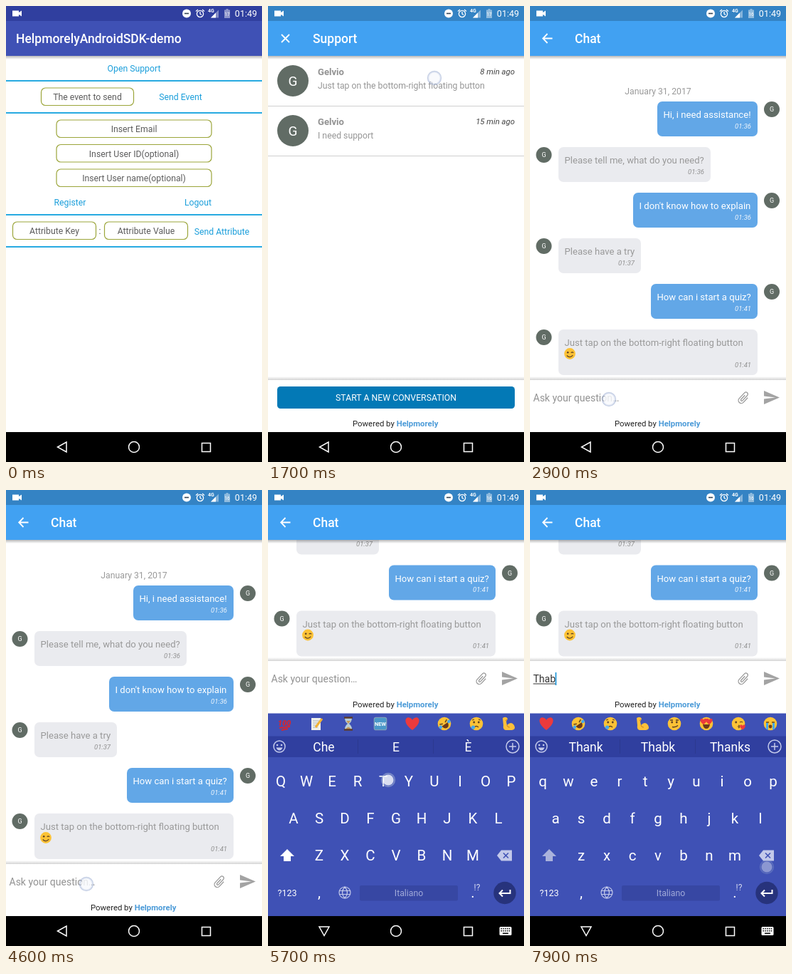
An HTML page with a canvas that plays this animation: 360 by 640 pixels, repeating every 8 s.

```html
<!DOCTYPE html>
<html lang="en">
<head>
<meta charset="utf-8">
<title>Support chat demo</title>
<style>
  html, body { margin: 0; width: 100%; height: 100%; overflow: hidden; background: #fff; }
  canvas { display: block; width: 360px; height: 640px; }
</style>
</head>
<body>
<canvas id="stage" width="360" height="640"></canvas>
<script>
const g = document.getElementById('stage').getContext('2d');
const LOOP = 8000, STEP = 100, BRAND = 'Helpmorely', PERSON = 'Gelvio';
const INDIGO = '#3f51b5', GREY = '#a3a3a3';

const clamp = v => Math.max(0, Math.min(1, v));
const easeOut = k => 1 - (1 - k) ** 2;
const current = (steps, t) => steps.filter(([from]) => from <= t).pop()[1];

function scoped(draw, { x = 0, y = 0, alpha = 1, rot = 0, scale = 1 } = {}) {
  g.save();
  g.globalAlpha *= alpha;
  g.translate(x, y);
  g.rotate(rot);
  g.scale(scale, scale);
  draw();
  g.restore();
}
function rect(x, y, w, h, fill) {
  g.fillStyle = fill;
  g.fillRect(x, y, w, h);
}
function rounded(x, y, w, h, r, fill, stroke) {
  g.beginPath();
  g.roundRect(x, y, w, h, r);
  if (fill) { g.fillStyle = fill; g.fill(); }
  if (stroke) { g.strokeStyle = stroke; g.lineWidth = 1.2; g.stroke(); }
}
function disc(x, y, r, fill) {
  g.beginPath();
  g.arc(x, y, r, 0, 7);
  g.fillStyle = fill;
  g.fill();
}
function text(str, x, y, size, color, align = 'left', style = '') {
  g.font = `${style} ${size}px Roboto, sans-serif`;
  g.textAlign = align;
  g.fillStyle = color;
  g.fillText(str, x, y);
}
function fillIcon(d, x, y, color, opts) {
  scoped(() => { g.fillStyle = color; g.fill(new Path2D(d)); }, { x, y, ...opts });
}
function lineIcon(d, x, y, color, width = 1.5, opts) {
  scoped(() => {
    g.strokeStyle = color;
    g.lineWidth = width;
    g.stroke(new Path2D(d));
  }, { x, y, ...opts });
}
const ring = r => `M${r} 0A${r} ${r} 0 1 1 ${-r} 0A${r} ${r} 0 1 1 ${r} 0`;
function shade(y, h, from, to) {
  const grad = g.createLinearGradient(0, y, 0, y + h);
  grad.addColorStop(0, `rgba(0,0,0,${from})`);
  grad.addColorStop(1, `rgba(0,0,0,${to})`);
  rect(0, y, 360, h, grad);
}

// --- system bars ---
function statusIcons(t) {
  const w = '#fff';
  fillIcon('M0 0H9V2.5L13 0V8L9 5.5V8H0Z', 9, 6.5, w);
  disc(254, 10.5, 6, w);
  rect(251, 9.7, 6, 1.6, '#345');
  lineIcon(ring(4.6) + 'M0 -3V0L2 1.5M-6 -3.5L-3 -6M6 -3.5L3 -6', 273, 11, w, 1.3);
  text('4G', 284, 9, 7, w, 'left', 'bold');
  fillIcon('M0 0L11 -11V0Z', 288, 16.5, 'rgba(255,255,255,.4)');
  fillIcon('M0 0L7 -7V0Z', 288, 16.5, w);
  fillIcon('M0 1.5H2.5V0H5.5V1.5H8V13H0Z', 307, 4, 'rgba(255,255,255,.45)');
  text(t < 2300 ? '17' : '16', 311, 14, 6.5, w, 'center');
  text('01:49', 353, 15, 12.5, w, 'right');
}
function navBar(keyboardOpen) {
  rect(0, 598, 360, 42, '#000');
  lineIcon(keyboardOpen ? 'M-7 -6H7L0 6.5Z' : 'M6 -7V7L-6.5 0Z', 79, 619, '#fff', 1.5);
  lineIcon(ring(7.5), 180, 619, '#fff');
  lineIcon('M-6 -6H6V6H-6Z', 281.5, 619.5, '#fff');
  if (!keyboardOpen) return;
  rounded(325.5, 613, 17, 12, 1.5, '#fff');
  for (let i = 0; i < 5; i++) {
    rect(327.5 + i * 2.8, 615, 1.5, 1.5, '#000');
    rect(327.5 + i * 2.8, 618, 1.5, 1.5, '#000');
  }
  rect(330, 621.5, 8, 1.5, '#000');
}
function header(title, x, bar, status) {
  shade(70, 5, .28, 0);
  rect(0, 0, 360, 70, bar);
  rect(0, 0, 360, 21, status);
  text(title, x, 52, 17.5, '#fff', 'left', '500');
}
const blueHeader = title => header(title, 63, '#41a1f2', '#3483c4');

// --- screens ---
function demoScreen() {
  const link = (s, x, y) => text(s, x, y, 12.25, '#1c9fdb', 'center');
  const field = (s, x, y, w) => {
    rounded(x + .5, y + .5, w, 24.5, 6, null, '#9ba53a');
    text(s, x + w / 2 + .5, y + 17.5, 12.25, '#5c5c5c', 'center');
  };
  rect(0, 0, 360, 640, '#fff');
  header(BRAND + 'AndroidSDK-demo', 14, INDIGO, '#303f9f');
  for (const y of [104, 149, 292, 337]) rect(0, y, 360, 2, '#27aae1');
  link('Open Support', 180, 92);
  link('Send Event', 245.5, 132);
  link('Register', 90, 280);
  link('Logout', 270, 280);
  link('Send Attribute', 303.5, 320.5);
  field('The event to send', 49, 114.5, 130);
  field('Insert Email', 70.5, 159.5, 218);
  field('Insert User ID(optional)', 70.5, 194, 218);
  field('Insert User name(optional)', 70.5, 228.5, 218);
  field('Attribute Key', 9, 302.5, 117);
  field('Attribute Value', 138, 302.5, 117);
  text(':', 132, 320, 12.25, '#555', 'center');
}
function avatar(x, y, r, size) {
  disc(x, y, r, '#616c65');
  text('G', x, y + size * .36, size, '#fff', 'center');
}
function poweredBy(y) {
  text('Powered by ', 119, y, 11.375, '#222');
  text(BRAND, 119 + g.measureText('Powered by ').width, y, 11.375, '#4c9bd8', 'left', 'bold');
}
function bottomPanel(y) {
  shade(y - 3, 5, 0, .17);
  rect(0, y + 2, 360, 640 - y, '#fff');
  poweredBy(y + 67);
}
function supportScreen(t) {
  rect(0, 0, 360, 640, '#fff');
  blueHeader('Support');
  lineIcon('M-5.5 -5.5L5.5 5.5M5.5 -5.5L-5.5 5.5', 24.5, 45.5, '#fff', 1.8);
  const row = (y, message, age) => {
    avatar(35, y + 35, 22, 19);
    text(PERSON, 70, y + 27, 13.125, '#929292', 'left', 'bold');
    text(message, 70, y + 46, 12.25, '#969696');
    text(age, 347, y + 25.5, 11.375, '#444', 'right', 'italic');
    rect(0, y + 70, 360, 1, '#cfcfcf');
  };
  if (t >= 700) {
    row(70, 'Just tap on the bottom-right floating button', '8 min ago');
    row(140, 'I need support', '15 min ago');
  }
  bottomPanel(523);
  rounded(13, 534, 334, 31, 4.5, '#0379b6');
  text('START A NEW CONVERSATION', 180, 554, 12.25, '#fff', 'center');
}
// top, left, right, text, time
const MESSAGES = [
  [134, 179, 320, 'Hi, i need assistance!', '01:36'],
  [198, 40, 254, 'Please tell me, what do you need?', '01:36'],
  [262, 145, 320, "I don't know how to explain", '01:36'],
  [326, 40, 156, 'Please have a try', '01:37'],
  [390, 170, 320, 'How can i start a quiz?', '01:41'],
  [454, 40, 320, 'Just tap on the bottom-right floating button', '01:41', 'wink'],
];
function chatMessages() {
  text('January 31, 2017', 180, 124, 12.25, '#999', 'center');
  for (const [y, x, right, message, time, extra] of MESSAGES) {
    const mine = x > 40, h = extra ? 64 : 49;
    rounded(x, y, right - x, h, 7, mine ? '#62a7e7' : '#eaebef');
    text(message, x + 8.5, y + 23, 13.125, mine ? '#fff' : '#999');
    text(time, right - 9, y + h - 11.5, 9.5, mine ? '#f2f7fd' : '#8f8f8f', 'right', 'italic');
    avatar(mine ? 340 : 19.5, y + 11, 11, 9);
    if (extra) emoji(extra, x + 16, y + 34, .85);
  }
}
const TYPED = [[0, ''], [6200, 'T'], [6500, 'Th'], [6700, 'Tha'], [6900, 'Thab'], [7000, 'Thabk'], [7800, 'Thab']];
function chatScreen(t) {
  const lifted = t >= 5200, y = lifted ? 238 : 523, typed = current(TYPED, t);
  rect(0, 0, 360, 640, '#fff');
  if (t >= 2400) scoped(chatMessages, { y: lifted ? -284.5 : 0 });
  blueHeader('Chat');
  lineIcon('M7 0H-6M0 -6.5L-6.3 0L0 6.5', 24.5, 45.5, '#fff', 1.8);
  bottomPanel(y);
  if (typed) {
    text(typed, 4.5, y + 32, 14, '#333');
    const w = g.measureText(typed).width;
    rect(4.5, y + 33.5, w, 1, '#333');
    rect(4 + w, y + 18, 1.7, 18, '#2196d8');
  } else {
    text('Ask your question…', 4.5, y + 32, 14, '#929292');
  }
  lineIcon('M4 -4V5A4 4 0 0 1 -4 5V-6A2.7 2.7 0 0 1 1.4 -6V4A1.3 1.3 0 0 1 -1.3 4V-4',
    300.5, y + 27, '#999', 1.3, { rot: .75 });
  fillIcon('M0 0L22 9.5L0 19V11.6L16 9.5L0 7.4Z', 329, y + 17, GREY);
}

// --- emoji ---
const HEART = 'M0 9C-14 -1 -10 -10 -4.500 -8.500Q-1 -8 0 -5Q1 -8 4.500 -8.500C10 -10 14 -1 0 9Z';
const heart = (x, y, scale = 1) => fillIcon(HEART, x, y, '#ec3a3c', { scale });
const dark = (d, w = 1.5) => lineIcon(d, 0, 0, '#5f4223', w);
const eyes = () => { disc(-3.3, -2, 1.4, '#5f4223'); disc(3.3, -2, 1.4, '#5f4223'); };
const grin = () => fillIcon('M-5 1H5Q4 7 0 7Q-4 7 -5 1Z', 0, 0, '#6b3a1c');
const tear = (x, y, r = 2.3) => disc(x, y, r, '#45a9ee');
const FACES = {
  wink() { disc(-3.3, -2, 1.5, '#5f4223'); dark('M2 -1.500Q4 -3.500 6 -1.500M-5 3Q0 8 5 2.500'); },
  rofl() { scoped(() => { dark('M-6 -3L-2 -1M6 -3L2 -1'); grin(); tear(-7, 1); tear(7, 1); }, { rot: -.6 }); },
  cry() { eyes(); dark('M-3 5Q0 2 3 5M-6 -5L-3 -6M6 -5L3 -6', 1.2); tear(-4.5, 5, 2.6); },
  smirk() { eyes(); dark('M-3 4.500Q2 5.500 5 2.500M-6 -5H-2M2 -5H6'); },
  love() { heart(-4, -3, .48); heart(4, -3, .48); grin(); },
  kiss() { disc(-3.3, -2, 1.4, '#5f4223'); dark('M2 -2Q4 -3.500 6 -2M0 2Q3 3 0 4Q3 5 0 6', 1.2); heart(6, 5, .4); },
  sob() {
    dark('M-6 -2H-2M2 -2H6');
    rect(-6, -1, 3, 9, '#45a9ee');
    rect(3, -1, 3, 9, '#45a9ee');
    disc(0, 4, 2.4, '#6b3a1c');
  },
};
const OBJECTS = {
  hundred() {
    text('100', 0, 2.5, 11, '#d9262f', 'center', 'italic 900');
    lineIcon('M-7 6L8 4M-4 9L5 7', 0, 0, '#d9262f', 1.8);
  },
  memo() {
    rect(-7, -8, 13, 17, '#f1f1ea');
    lineIcon('M-5 -4H4M-5 -1H3M-5 2H1M-5 5H2', 0, 0, '#a8b3bd', 1);
    lineIcon('M8 -7L-1 5', 0, 0, '#f2b234', 3);
  },
  hourglass() {
    fillIcon('M-5 -8H5Q5 -3 1 0Q5 3 5 8H-5Q-5 3 -1 0Q-5 -3 -5 -8Z', 0, 0, '#b9cdd6');
    fillIcon('M-3 -4H3L0 0ZM-4 8Q0 1 4 8Z', 0, 0, '#c99a58');
    lineIcon('M-6 -8.500H6M-6 8.500H6', 0, 0, '#5d3c2c', 2.4);
  },
  fresh() { rounded(-8.7, -8.7, 17.4, 17.4, 2.5, '#4a97c9', '#7f9fb8'); text('NEW', 0, 2.7, 7.5, '#fff', 'center', 'bold'); },
  heart() { heart(0, 0); },
  flex() {
    fillIcon('M-8 -8Q-3 -11 -1 -7L-3 -3L-2 2Q4 -4 8 2Q11 8 5 9H-4Q-8 8 -7 2Z', 0, 0, '#fcc03a');
    lineIcon('M-2 2Q-1 5 2 5M-4 -4L-2 -6', 0, 0, '#d99222', 1.2);
  },
};
function emoji(kind, x, y, scale = 1) {
  scoped(() => {
    if (FACES[kind]) { disc(0, 0, 9.3, '#fcc236'); FACES[kind](); } else OBJECTS[kind]();
  }, { x, y, scale });
}

// --- keyboard ---
const EMOJI_BEFORE = ['hundred', 'memo', 'hourglass', 'fresh', 'heart', 'rofl', 'cry', 'flex'];
const EMOJI_AFTER = ['heart', 'rofl', 'cry', 'flex', 'smirk', 'love', 'kiss', 'sob'];
const EMOJI_ALPHA = [[0, 1], [6700, .7], [6800, .35], [6900, .35], [7000, .7], [7100, 1]];
const SUGGESTIONS = [
  [0, ['Che', 'E', 'È']], [6300, ['Ti', 'Te', 'Tu']], [6600, ['The', 'Tha', 'Tho']],
  [6800, ['That', 'Than', 'Then']], [7200, ['Thank', 'Thabk', 'Thanks']],
];
const POPUPS = [['h', 216, 461, 6400], ['a', 36, 461, 6600], ['b', 216, 513, 6800], ['k', 288, 461, 6900]];

function keyboard(t) {
  const upper = t < 6200, dim = '#aab2dc', pale = '#c3c9ea';
  rect(0, 313.5, 360, 326.5, INDIGO);
  rect(0, 345.5, 360, 29.5, '#303f9f');
  scoped(() => (t < 6900 ? EMOJI_BEFORE : EMOJI_AFTER).forEach((kind, i) => emoji(kind, 23 + 45 * i, 328)),
    { alpha: current(EMOJI_ALPHA, t) });
  current(SUGGESTIONS, t).forEach((word, i) => text(word, 78.5 + 101.5 * i, 367, 17.5, '#fff', 'center'));
  rect(126, 350, 1, 20, '#2c398f');
  rect(232, 350, 1, 20, '#2c398f');
  lineIcon(ring(8), 16, 360, pale);
  fillIcon('M-4.500 1.500H4.500Q3 5.500 0 5.500Q-3 5.500 -4.500 1.500Z', 16, 360, pale);
  disc(13, 358, 1.3, pale);
  disc(19, 358, 1.3, pale);
  lineIcon(ring(9) + 'M-5 0H5M0 -5V5', 344, 360, pale);

  [['qwertyuiop', 18, 409], ['asdfghjkl', 36, 461], ['zxcvbnm', 72, 513]].forEach(([keys, x, y]) =>
    [...keys].forEach((key, i) =>
      text(upper ? key.toUpperCase() : key, x + 36 * i, y + 7.3, 20.5, '#fff', 'center')));
  fillIcon('M0 -9L10 1H5V8H-5V1H-10Z', 27, 513, upper ? '#fff' : dim);
  fillIcon('M-11 0L-5 -7.500H10V7.500H-5Z', 333, 513, pale);
  lineIcon('M-2 -3.500L5 3.500M5 -3.500L-2 3.500', 333, 513, INDIGO, 1.6);

  text('?123', 27, 570, 12.5, '#fff', 'center');
  text(',', 72, 572, 20.5, '#fff', 'center');
  lineIcon(ring(8) + 'M-8 -2.500H8M-8 2.500H8M0 -8Q-7 0 0 8Q7 0 0 -8', 108, 565, pale, 1.2);
  rounded(129, 555, 138, 21.5, 2, '#3747a3');
  text('Italiano', 198, 570, 12.25, '#a1aad9', 'center');
  text('.', 288, 572, 20.5, '#fff', 'center');
  text('!?', 294, 562, 12, '#d6daf0', 'center');
  disc(333, 565.5, 15.7, '#27337c');
  lineIcon('M7.500 -4V1H-7M-3 -3.500L-7.500 1L-3 5.500', 333, 565, '#fff', 2);

  for (const [key, x, y, from] of POPUPS) {
    if (t !== from) continue;
    rounded(x - 21.5, y - 82, 43, 101.5, 2, '#2e3982');
    text(key, x, y - 45.5, 30, '#fff', 'center');
  }
}

// --- touches: x, y, pressed from, released ---
const TOUCHES = [
  [180, 92, 100, 200], [234, 101, 1700, 1800], [111, 552, 2800, 4500], [113, 553, 4600, 4700],
  [114, 553, 5000, 5000], [169, 407, 5700, 6100], [218, 470, 6400, 6400], [42, 472, 6600, 6600],
  [230, 538, 6700, 6700], [295, 448, 6900, 7000], [333, 529, 7700, 7800],
];
function touches(t) {
  for (const [x, y, down, up] of TOUCHES) {
    if (t < down || (down === 2800 && t > up)) continue;
    const alpha = clamp(1 - Math.max(0, t - up) / 300) ** 2;
    scoped(() => {
      disc(0, 0, 10, 'rgba(180,195,225,.35)');
      lineIcon(ring(9.5), 0, 0, 'rgba(150,168,205,.4)', 1.4);
      disc(0, 0, 7.5, 'rgba(255,255,255,.75)');
    }, { x, y, alpha });
  }
}

// A new activity fades in while rising a little.
function enter(screen, t, from) {
  const k = easeOut(clamp((t - from) / 300));
  scoped(() => screen(t), { y: 50 * (1 - k), alpha: k });
}

function render(t) {
  g.clearRect(0, 0, 360, 640);
  if (t < 600) demoScreen();
  if (t > 300 && t < 2300) enter(supportScreen, t, 300);
  if (t > 1900) enter(chatScreen, t, 1900);
  if (t >= 5100) {
    const k = easeOut(clamp((t - 5000) / 400));
    scoped(() => keyboard(t), { y: 285 * (1 - k) });
  }
  navBar(t >= 5100);
  statusIcons(t);
  touches(t);
}

function tick(now) {
  render(Math.floor((now % LOOP) / STEP) * STEP);
  requestAnimationFrame(tick);
}
requestAnimationFrame(tick);
</script>
</body>
</html>
```
